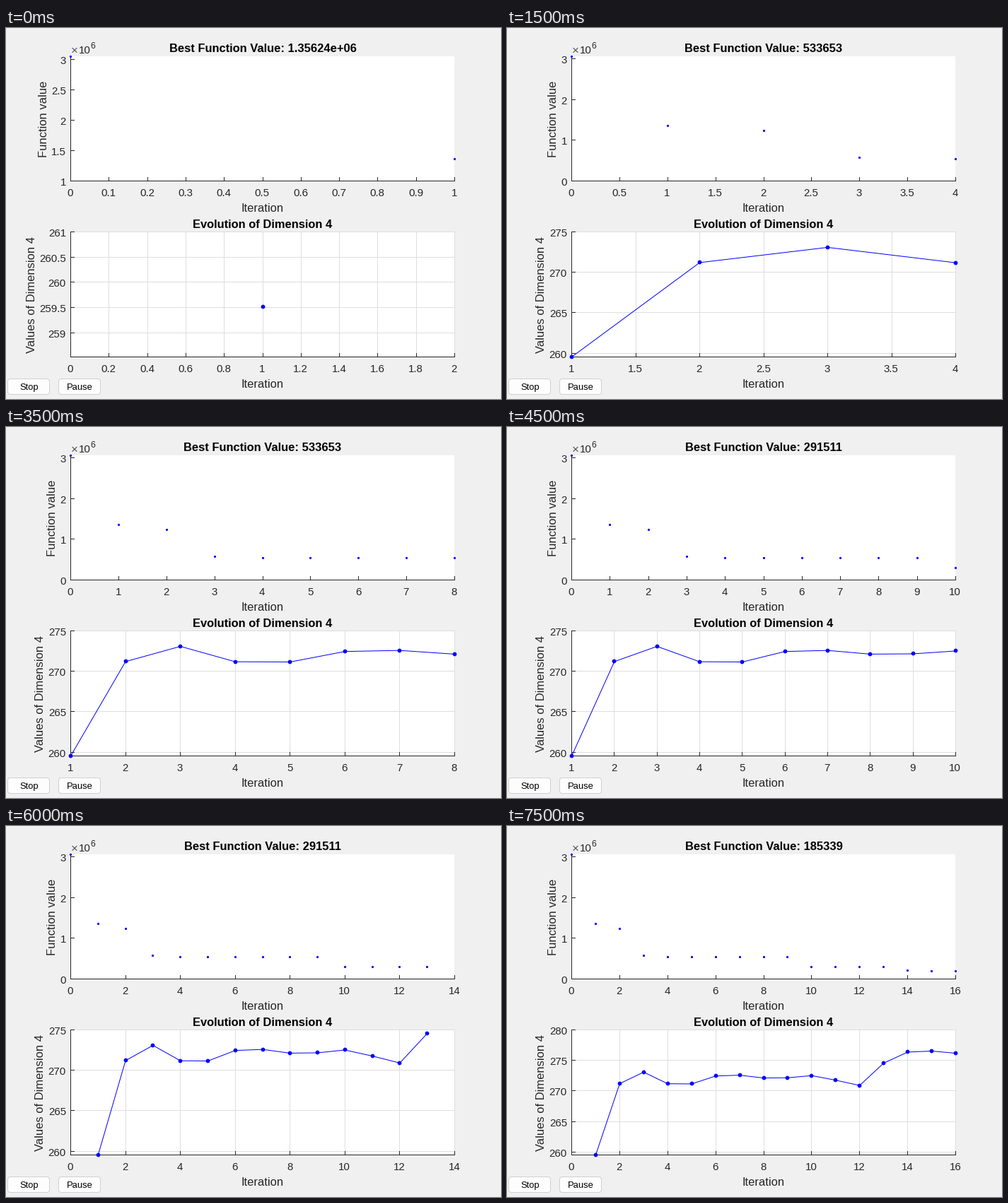
Animation of 700x525 px, one loop 8000 ms. Source, as a matplotlib script:

```python
import math

import matplotlib.pyplot as plt
from matplotlib.animation import FuncAnimation
from matplotlib.patches import Circle, FancyBboxPatch, Rectangle

W, H, DPI = 700, 525, 100
PT = 72 / DPI  # points per pixel
LEFT, RIGHT = 91.5, 634.5
MID = (LEFT + RIGHT) / 2
INK, BLUE, GRID = "#262626", "#0000ff", "#dedede"

# Best cost per iteration (from 0), in millions
BEST = ([3.058, 1.35624, 1.23078, 0.567219] + [0.533653] * 6
        + [0.291511] * 4 + [0.213468] + [0.185339] * 2)
# Value of the followed dimension per iteration (from 1)
DIM = [259.52, 271.2, 273.08, 271.18, 271.15, 272.45, 272.58, 272.12,
       272.16, 272.51, 271.76, 270.9, 274.56, 276.36, 276.53, 276.18]

plt.rcParams["font.family"] = "Liberation Sans"
fig = plt.figure(figsize=(W / DPI, H / DPI), dpi=DPI, facecolor="#f0f0f0")
ax = fig.add_axes([0, 0, 1, 1])


def center(v):
    """Middle of the pixel that holds v."""
    return math.floor(v) + 0.5


def text(x, y, s, size=15, color=INK, ha="center", **kw):
    ax.text(x, y, s, fontsize=size * PT, color=color, ha=ha, va="baseline",
            zorder=5, **kw)


def line(xs, ys, color=INK, z=2):
    """Crisp horizontal or vertical line."""
    ax.plot([center(x) for x in xs], [center(y) for y in ys], color=color,
            lw=PT, zorder=z, solid_capstyle="projecting", snap=False)


def dots(xs, ys, radius):
    for x, y in zip(xs, ys):
        ax.add_patch(Circle((center(x), center(y)), radius, fc=BLUE,
                            ec="none", zorder=4, snap=False))


def x_scale(lo, hi):
    """Tightest rounded limits with at most eleven ticks."""
    best = None
    for per_unit in (10, 5, 2, 1, 0.5, 0.2):
        a = math.floor(round(lo * per_unit, 6))
        b = math.ceil(round(hi * per_unit, 6))
        span = (b - a) / per_unit
        if b - a <= 10 and (best is None or span < best[0] - 1e-9):
            best = span, [k / per_unit for k in range(a, b + 1)]
    return best[1]


def y_ticks(lo, hi):
    """Finest step that gives at most five ticks."""
    for step in (0.5, 1, 2, 5):
        a, b = math.ceil(lo / step), math.floor(hi / step)
        if b - a < 5:
            return [k * step for k in range(a, b + 1)]


def panel(top, bottom, xticks, ylim, title, ylabel, label_x, label_y, grid):
    x0, x1 = xticks[0], xticks[-1]
    y0, y1 = ylim

    def px(v):
        return LEFT + (v - x0) / (x1 - x0) * (RIGHT - LEFT)

    def py(v):
        return bottom - (v - y0) / (y1 - y0) * (bottom - top)

    x, y = math.floor(LEFT), math.floor(top)
    ax.add_patch(Rectangle((x, y), RIGHT - LEFT, math.floor(bottom) - y,
                           fc="white", ec="none", zorder=0))
    for v in xticks:
        x = px(v)
        if grid:
            line([x, x], [top, bottom], GRID, 1)
        line([x, x], [bottom - 5, bottom])
        text(x - 0.7, bottom + 21.5, f"{v:g}")
    yticks = y_ticks(y0, y1)
    for v in yticks:
        y = py(v)
        if grid:
            line([LEFT, RIGHT], [y, y], GRID, 1)
        line([LEFT, LEFT + 5], [y, y])
        text(85, y + 6.5, f"{v:g}", ha="right")
    line([LEFT, LEFT], [top, bottom])
    line([LEFT, RIGHT], [bottom, bottom])

    if any(v % 1 for v in yticks):
        label_x -= 12  # make room for decimals
    text(label_x, label_y, ylabel, 16.5, rotation=90, rotation_mode="anchor")
    text(MID - 0.7, bottom + 43.5, "Iteration", 16.5)
    text(MID, top - 5.7, title, 16.5, "black", weight="bold")
    return px, py


def button(x, label):
    ax.add_patch(FancyBboxPatch((x + 4, 500.5), 51, 14,
                                boxstyle="round,pad=4,rounding_size=4",
                                fc="#fdfdfd", ec="#d0d0d0", lw=PT,
                                snap=False))
    text(x + 30, 512.3, label, 13, "black")


def draw(frame):
    n = frame + 1
    ax.clear()
    ax.set(xlim=(0, W), ylim=(H, 0))
    ax.axis("off")

    best = BEST[:n + 1]
    px, py = panel(40, 216.5, x_scale(0, n),
                   (math.floor(best[-1]), best[0]),
                   f"Best Function Value: {best[-1] * 1e6:g}",
                   "Function value", 70.5, 128.5, False)
    dots([px(i) for i in range(n + 1)], [py(v) for v in best], 1.6)
    text(91.5, 37, "×", 17, "#555555", ha="left")
    text(102.5, 36.3, "10", ha="left")
    text(119.5, 29, "6", 12, ha="left")

    dim = DIM[:n]
    if n == 1:
        xticks, ylim = x_scale(0, 2), (dim[0] - 1, 261)
    else:
        xticks = x_scale(1, n)
        ylim = min(dim), 5 * math.ceil(max(dim) / 5)
    px, py = panel(288.5, 465.5, xticks, ylim, "Evolution of Dimension 4",
                   "Values of Dimension 4", 53.3, 377.5, True)
    xs, ys = [px(i + 1) for i in range(n)], [py(v) for v in dim]
    ax.plot(xs, ys, color=BLUE, lw=PT, zorder=3, snap=False)
    dots(xs, ys, 2.9)

    button(2.5, "Stop")
    button(74.5, "Pause")
    return []


anim = FuncAnimation(fig, draw, frames=len(DIM), interval=500,
                     repeat=True, repeat_delay=0)
plt.show()
```
